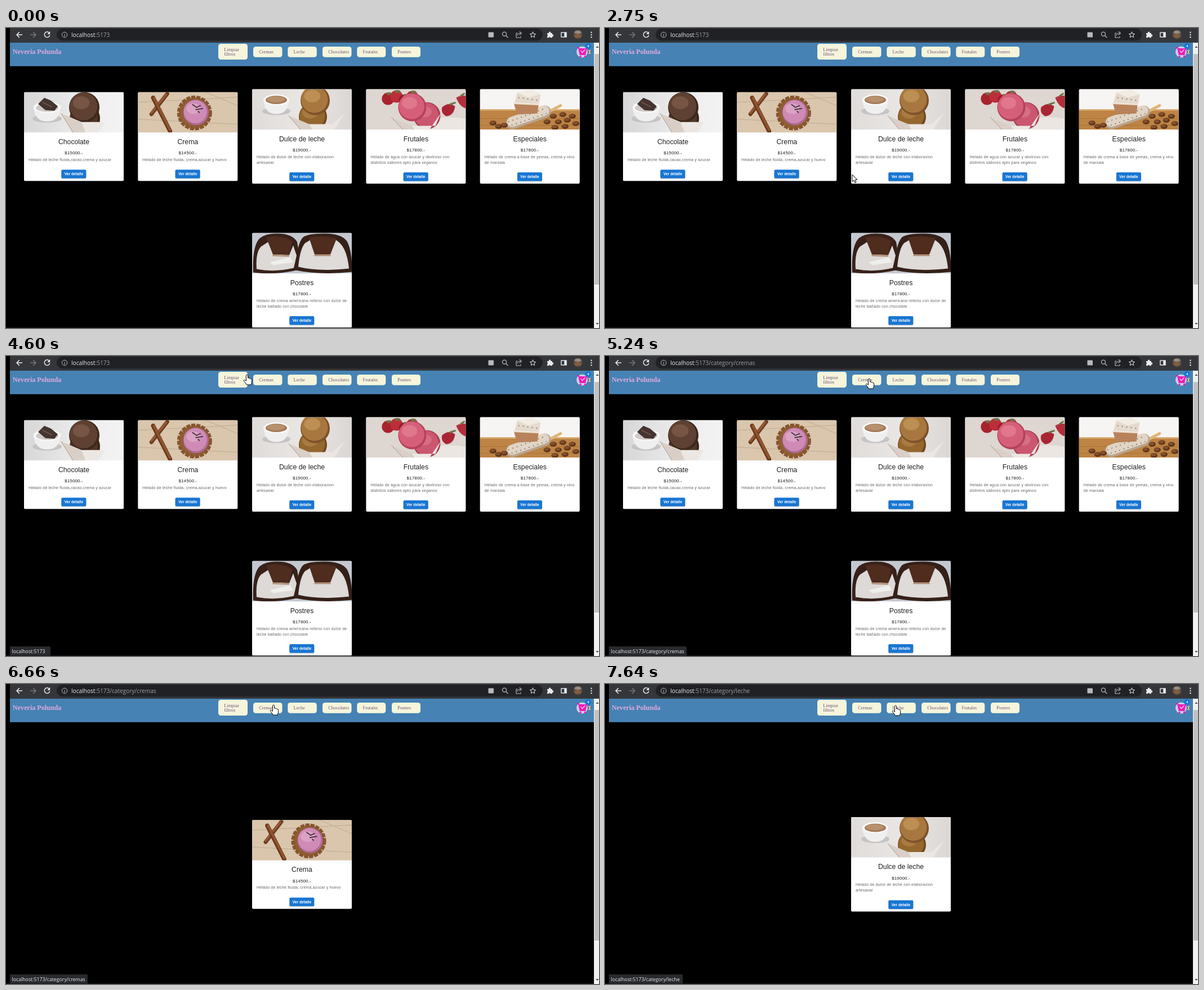
Recreate the animation shown at these times as an HTML page. Size 1053x532 px, loop 8 s.

```html
<!DOCTYPE html>
<html lang="es">
<head>
<meta charset="utf-8">
<title>Neveria Polunda</title>
<style>
  html, body { margin: 0; width: 100%; height: 100%; overflow: hidden; background: #000; }
  svg { display: block; width: 1053px; height: 532px; }
  text { white-space: pre; }
  .ui { font-family: "Open Sans", "Noto Sans", sans-serif; }
  .slab { font-family: "Liberation Serif", serif; }
  .card { font-family: "Liberation Sans", Arial, sans-serif; }
</style>
</head>
<body>
<svg id="stage" viewBox="0 0 1053 532" xmlns="http://www.w3.org/2000/svg"></svg>
<script>
const LOOP = 8000;
const HOST = 'localhost', PORT = ':5173';

// Shape helpers
const rect = (x, y, w, h, fill, r = 0) =>
  `<rect x="${x}" y="${y}" width="${w}" height="${h}" rx="${r}" fill="${fill}"/>`;
const oval = (x, y, rx, ry, fill) => `<ellipse cx="${x}" cy="${y}" rx="${rx}" ry="${ry}" fill="${fill}"/>`;
const dot = (x, y, r, fill) => oval(x, y, r, r, fill);
const shape = (d, fill) => `<path d="${d}" fill="${fill}"/>`;
const line = (d, stroke, w = 1.4) =>
  `<path d="${d}" fill="none" stroke="${stroke}" stroke-width="${w}" stroke-linecap="round" stroke-linejoin="round"/>`;
const text = (x, y, size, fill, str, more = '') =>
  `<text x="${x}" y="${y}" font-size="${size}" fill="${fill}" ${more}>${str}</text>`;

// Picture helpers; each picture fills a 177 by 71.5 box
const wall = fill => rect(-6, -6, 189, 84, fill);
const scoop = (x, y, r, light, base, dark) =>
  dot(x, y, r, dark) + dot(x - r * .05, y - r * .06, r * .91, base) +
  oval(x - r * .2, y - r * .3, r * .55, r * .42, light);
const bowl = (x, y, right, top) =>
  shape(`M${x} ${y}L${x + 36} ${y + 15}L${x + 78} ${y + 15}L${right} ${top}L${right - 22} 74H${x + 22}Z`, '#ece7e3') +
  shape(`M${x} ${y}L${x + 36} ${y + 15}L${x + 44} 74H${x + 22}Z`, '#d9cfc7') +
  line(`M${x} ${y}L${x + 22} 73`, '#a99a8e', 1);
const cup = (x, y, r) =>
  oval(x, y + 20, r + 2, 7, '#c6c4c3') +
  shape(`M${x - r} ${y}Q${x - r + 2} ${y + 25} ${x} ${y + 25}Q${x + r - 2} ${y + 25} ${x + r} ${y}Z`, '#efefef') +
  oval(x, y, r, r * .42, '#fafafa');

const pictures = {
  chocolate: () =>
    wall('url(#greyWall)') + cup(41, 27, 24) + oval(41, 28, 20, 7, '#cfcbc9') +
    shape('M25 21L36 10L48 15L60 25L54 33L38 32Z', '#45342f') + line('M33 18L49 26', '#6a544b', 2) +
    scoop(108, 47, 27, '#66472f', '#523624', '#3a2519') +
    scoop(107, 27, 27, '#765544', '#5e4132', '#3e291d') + bowl(66, 38, 153, 37),
  crema: () =>
    wall('#d9c6ad') + line('M0 18L177 9M0 48L177 57M120 0L177 24', '#c2a98c', 1) +
    line('M52 3L24 39', '#6f3b20', 7) + line('M50 4L24 37', '#955a34', 3.5) +
    line('M27 10L57 69', '#6b381f', 7.5) + line('M28 10L57 67', '#8f552f', 4) +
    `<circle cx="100.5" cy="37" r="28" fill="#9a6537" stroke="#85552f" stroke-width="6" stroke-dasharray="7 2"/>` +
    dot(100.5, 37, 25, '#8f5e36') + scoop(103, 36, 22.5, '#dba2c4', '#cf8bb6', '#b06b98') +
    line('M97 22L104 27L111 24M103 31L115 29M107 34L109 36', '#4a3846', 2),
  leche: () =>
    wall('url(#warmWall)') + cup(43, 19, 23) + oval(43, 19, 19, 7.6, '#a27a59') + oval(42, 18, 16, 5.4, '#b8906c') +
    scoop(108, 49, 25, '#a97a41', '#94672f', '#70491f') +
    scoop(112, 20, 26, '#bd8f54', '#a8773f', '#7d5329') + bowl(65, 47, 166, 41),
  frutales: () =>
    wall('#ded6d1') + oval(150, 66, 50, 16, '#ebe6e2') +
    [[39, 17, '#a8232e'], [54, 13, '#bb2f38'], [69, 20, '#9c1d2a'], [82, 14, '#b02a36']]
      .map(([x, y, fill]) => dot(x, y, 11, fill) + oval(x + 2, y - 9, 5, 2.5, '#6d7446')).join('') +
    shape('M135 32Q146 22 158 30Q156 47 142 48Q132 42 135 32Z', '#a92534') +
    shape('M160 15Q173 8 183 14V34Q168 36 160 15Z', '#b52d3b') + line('M149 27L158 24M168 12L174 8', '#6d7446', 3) +
    scoop(108, 47, 24, '#d76c83', '#cb566f', '#aa3c55') +
    scoop(82, 32, 25, '#e0778d', '#d55f78', '#b5425c') + bowl(45, 50, 133, 42),
  especiales: () =>
    wall('#f6f5f3') + rect(-6, 36, 189, 42, '#bd8445') +
    line('M-3 37H180', '#d7a668', 2.5) + line('M0 52H177M0 64H177', '#aa7237', 1) +
    line('M122 40L143 29', '#dfb779', 5) +
    line('M57 60L115 40', '#b8a48c', 22) + line('M57 58L114 38', '#e0d5c6', 18) +
    shape('M61 26L66 6L92 1L108 9L104 30L84 34Z', '#e4dacd') + shape('M66 6L92 1L108 9L86 15Z', '#f1ebe2') +
    shape('M60 25L104 27L102 43L66 45Z', '#b9825a') + line('M61 25L104 27', '#eee4d6', 3) +
    `<path d="M50 58L116 34M56 64L118 43M68 15L104 20" fill="none" stroke="#9b7f62" stroke-width="2" stroke-dasharray="2 6"/>` +
    [[23, 60], [33, 66], [43, 64], [119, 58], [130, 48], [139, 58], [147, 45], [155, 55], [151, 66], [164, 48], [170, 61], [133, 68]]
      .map(([x, y]) => oval(x, y, 6.2, 4.2, '#5e341c') + oval(x - 1, y - 1, 4.5, 2.5, '#85502c')).join(''),
  postres: () =>
    wall('#c3c8d0') +
    shape('M2 70Q0 22 14 9Q24 1 44 1Q72 1 80 16L84 40L79 66Q40 75 2 70Z', '#38211a') +
    shape('M8 64Q6 34 16 24L30 15L37 38L66 39L73 22L79 40L74 62Q40 70 8 64Z', '#dcd9d6') +
    shape('M25 8Q48 2 71 14L66 39L37 38Z', '#4e2c1e') + line('M37 40L65 41', '#a3683c', 1.5) +
    shape('M31 52L67 43L73 52L38 57Z', '#f0eeea') +
    shape('M77 66Q79 20 90 8Q98 1 128 1Q158 1 168 14Q177 28 178 69Q122 75 77 66Z', '#352019') +
    shape('M82 60Q85 28 94 18L104 12L112 38L138 38L148 12Q168 22 172 63Q119 69 82 60Z', '#dedbd8') +
    shape('M101 8Q126 3 150 10L139 38H111Z', '#4f2c1e') + line('M111 40H139', '#a3683c', 1.5)
};

const products = [
  { id: 'chocolate', name: 'Chocolate', price: 15000, about: ['Helado de leche fluida,cacao,crema y azucar'], at: [32, 113.7] },
  { id: 'crema', name: 'Crema', price: 14500, about: ['Helado de leche fluida, crema,azucar y huevo'], at: [234.3, 113.7] },
  { id: 'leche', name: 'Dulce de leche', price: 19000, about: ['Helado de dulce de leche con elaboracion', 'artesanal'], at: [437, 108.5] },
  { id: 'frutales', name: 'Frutales', price: 17800, about: ['Helado de agua con azucar y dextroso con', 'distintos sabores apto para veganos'], at: [639.4, 108.5] },
  { id: 'especiales', name: 'Especiales', price: 17800, about: ['Helado de crema a base de yemas, crema y vino', 'de marsala'], at: [841.7, 108.5] },
  { id: 'postres', name: 'Postres', price: 17800, about: ['Helado de crema americana relleno con dulce de', 'leche bañado con chocolate'], at: [437, 363.6] }
];

function card(item, [x, y] = item.at) {
  const extra = (item.about.length - 1) * 10;
  const mid = 'text-anchor="middle"';
  return `<g class="card" transform="translate(${x} ${y})">` +
    rect(0, 0, 177, 157.6 + extra, '#fff', 2) +
    `<g clip-path="url(#photo)"><g filter="url(#soft)">${pictures[item.id]()}</g></g>` +
    text(88.5, 92.3, 12.25, '#212121', item.name, mid) +
    text(88.5, 110.8, 8, '#1c1c1c', `$${item.price}.-`, mid + ' letter-spacing=".15"') +
    item.about.map((s, i) => text(8, 122.2 + i * 10, 7, '#666', s, 'letter-spacing=".17"')).join('') +
    rect(66, 138.2 + extra, 44.4, 15.6, '#0003', 2) +
    rect(66.3, 137.5 + extra, 44, 15.4, '#1976d2', 2) +
    text(88.4, 147.5 + extra, 6.7, '#fff', 'Ver detalle', mid + ' font-weight="bold"') + '</g>';
}

const navButtons = [
  [377, 28, 52, 28, 'Limpiar', 'filtros'], [439, 33, 51.5, 18.8, 'Cremas'], [500.3, 33, 51.5, 18.8, 'Leche'],
  [562, 33, 51.5, 18.8, 'Chocolates'], [623.3, 33, 51, 18.8, 'Frutales'], [685, 33, 51, 18.8, 'Postres']
];

function toolbar() {
  const ink = '#e8eaed', soft = '#b6b9bd';
  return rect(7, 0, 1046, 26, '#35363a') + rect(90, 1, 863, 21.5, '#202124', 10.7) +
    line('M28.5 12H19.5M23.5 7.5L19 12L23.5 16.5', ink, 1.5) +
    line('M43.5 12H52.5M48.5 7.5L53 12L48.5 16.5', '#74767a', 1.5) +
    line('M76.6 8.4A4.8 4.8 0 1 0 77.6 13.2', ink, 1.5) + shape('M78.2 6V11H73.2Z', ink) +
    `<circle cx="104" cy="12" r="4.7" fill="none" stroke="${soft}"/>` + line('M104 11.7V14.4M104 9.5V9.6', soft, 1.1) +
    rect(856.5, 7.5, 9.5, 9, soft, 1) +
    `<circle cx="885" cy="10.7" r="3.5" fill="none" stroke="${soft}" stroke-width="1.3"/>` + line('M888 13.7L891 16.7', soft) +
    line('M908 9H906V17H914V15M908 13Q908.5 9.5 913 9.2M912 6.5L915.5 9.2L912 12', soft, 1.1) +
    line('M935.5 7L937 10.3L940.5 10.6L937.8 13L938.7 16.5L935.5 14.6L932.3 16.5L933.2 13L930.5 10.6L934 10.3Z', ink, 1) +
    shape('M961 9H964A1.8 1.8 0 1 1 967.4 9H970V11.5A1.8 1.8 0 1 1 970 15V17.3H967.2A1.8 1.8 0 0 0 963.8 17.3H961V14.5A1.8 1.8 0 0 0 961 11.3Z', ink) +
    `<rect x="986" y="8" width="9" height="8" fill="none" stroke="${ink}" stroke-width="1.4"/>` + rect(991.3, 8, 4, 8, ink) +
    dot(1015.5, 11.5, 8, '#5f4c42') + oval(1015.5, 7.5, 6, 3, '#978a82') + oval(1015.5, 14, 6, 3, '#85603f') +
    [7.8, 12, 16.2].map(y => dot(1039.5, y, 1.2, ink)).join('');
}

function header() {
  return rect(7, 26, 1037, 41.7, '#4682b4') +
    '<g class="slab">' + text(12, 46, 12.1, '#e0aadd', 'Neveria Polunda', 'font-weight="bold"') +
    navButtons.map(([x, y, w, h, ...rows]) => rect(x, y, w, h, '#f5f5dc', 4.5) +
      rows.map((s, i) => text(x + 10.3, (rows.length > 1 ? 40.5 : 45) + i * 8.6, 8.3, '#70517c', s)).join('')).join('') + '</g>' +
    dot(1023, 42.5, 10, '#c9cfee') +
    line('M1014.5 35H1017L1019.5 47H1029', '#f01cb5', 2) + shape('M1017 36H1032L1029.5 46H1019Z', '#f01cb5') +
    line('M1021 41L1023.5 43.5L1028 38.5', '#d9d4f2', 1.2) +
    dot(1020, 50.5, 1.8, '#f01cb5') + dot(1028.5, 50.5, 1.8, '#f01cb5') +
    dot(1033.7, 32, 5.3, '#1976d2') +
    text(1033.7, 34.3, 6.2, '#fff', '4', 'class="card" text-anchor="middle" font-weight="bold"') +
    rect(1033.8, 38.2, 5, 8.6, '#333', 1) + rect(1034.3, 38.7, 4, 7.6, '#efefef', .6) +
    text(1036.3, 45.2, 7, '#111', '0', 'class="card" text-anchor="middle"');
}

const scrollbar = () => rect(1044, 26, 9, 506, '#f1f1f1') + rect(1045, 46, 8, 409, '#c1c1c1') +
  shape('M1047.2 35L1050 32L1052.8 35Z', '#505050') + shape('M1047.2 523L1050 526L1052.8 523Z', '#505050');

const stage = document.getElementById('stage');
stage.innerHTML = `<defs>
  <clipPath id="photo"><path d="M0 71.6V2Q0 0 2 0H175Q177 0 177 2V71.6Z"/></clipPath>
  <filter id="soft"><feGaussianBlur stdDeviation=".7"/></filter>
  <linearGradient id="greyWall"><stop stop-color="#d6d5d6"/><stop offset=".6" stop-color="#efeeee"/><stop offset="1" stop-color="#f4f3f3"/></linearGradient>
  <linearGradient id="warmWall"><stop stop-color="#dfdbd9"/><stop offset=".5" stop-color="#e9e6e4"/><stop offset="1" stop-color="#dad6d4"/></linearGradient>
  </defs>` + rect(0, 0, 1053, 532, '#000') + toolbar() +
  `<text class="ui" x="116" y="15.6" font-size="10.15" fill="#e8eaed">${HOST}<tspan id="url" fill="#9aa0a6"></tspan></text>` +
  header() + '<g id="list"></g>' + rect(0, 531, 1044, 1, '#15191d') + scrollbar() +
  `<g id="status" class="ui"><path fill="#292a2d"/>${text(10.5, 526.7, 8.75, '#e8eaed', '')}</g>
  <g id="cursor" fill="#fff" stroke="#000" stroke-linejoin="round"><path/></g>`;

const $ = id => document.getElementById(id);
const list = $('list'), url = $('url'), hintBar = $('status'), cursor = $('cursor');
const [hintBox, hintText] = hintBar.children;

// Pointer strokes: start, end, number of steps, then [step, x, y] stops
const strokes = [
  [930, 1690, 12, [[0, 965, 534], [1, 953, 520], [5, 880, 498], [12, 750, 474]]],
  [1760, 2540, 13, [[0, 750, 474], [4, 580, 450], [8, 373, 390], [13, 451, 295]]],
  [2610, 3190, 10, [[0, 451, 295], [3, 439, 260], [6, 390, 130], [10, 312, 20]]],
  [3570, 4340, 12, [[0, 312, 20], [3, 345, 8], [7, 401, 31.5], [12, 404, 38]]],
  [4410, 5110, 11, [[0, 404, 38], [4, 428, 33], [8, 452, 36], [11, 469, 40]]],
  [6660, 7460, 13, [[0, 469, 40], [3, 487, 31], [5, 503, 28], [8, 517, 32.5], [13, 516, 38]]]
];

function along(stops, step) {
  const i = Math.max(1, stops.findIndex(s => s[0] >= step));
  const [a, ax, ay] = stops[i - 1], [b, bx, by] = stops[i];
  const u = (step - a) / (b - a);
  return [ax + (bx - ax) * u, ay + (by - ay) * u];
}

function pointer(t) {
  const stroke = strokes.filter(s => t >= s[0]).pop();
  if (!stroke) return null;
  const [start, end, count, stops] = stroke;
  const step = Math.floor((t - start) / (end - start) * (count - 1) + .3);
  return along(stops, Math.min(count, step + 1));
}

const ARROW = 'M0 0V12.5L2.9 9.8L4.9 14.4L7 13.5L5 9H9Z';
const HAND = 'M-1.6 1.2Q0 -1.2 1.6 1.2V6Q3.2 5 4.2 6.8Q5.8 6 6.6 7.6Q8.6 7 8.6 9.4V13Q8.2 15 7 18H-.8Q-2 14.8-5.5 11.5Q-6 8.6-3.4 9.8L-1.6 11.3Z';
const BEAM = 'M-2.5 -7H2.5M0 -7V7M-2.5 7H2.5';

function drawPointer(t) {
  const at = pointer(t);
  cursor.style.display = at ? '' : 'none';
  if (!at) return;
  const [x, y] = at;
  const hover = navButtons.some(([bx, by, w, h]) => x >= bx && x <= bx + w && y >= by && y <= by + h);
  const beam = y < 23;
  cursor.setAttribute('transform', `translate(${x.toFixed(1)} ${y.toFixed(1)})`);
  cursor.setAttribute('stroke', beam ? '#e8eaed' : '#000');
  cursor.firstElementChild.setAttribute('d', beam ? BEAM : hover ? HAND : ARROW);
}

// Link hints: shown from, fading from, path, box width
const hints = [[4060, 4650, '', 72], [4780, 7080, '/category/cremas', 138], [7300, LOOP, '/category/leche', 131]];

function drawHint(t) {
  const hint = hints.filter(h => t >= h[0]).pop();
  const alpha = hint ? Math.max(0, Math.min(1, (t - hint[0]) / 120, 1 - (t - hint[1]) / 125)) : 0;
  hintBar.setAttribute('opacity', alpha);
  if (!hint) return;
  const right = 7 + hint[3];
  hintText.textContent = HOST + PORT + hint[2];
  hintBox.setAttribute('d', `M7 515H${right - 2}Q${right} 515 ${right} 517V531H7Z`);
}

const views = {
  all: () => products.map(p => card(p)).join(''),
  cremas: () => card(products[1], [437, 241.2]),
  leche: () => card(products[2], [437, 236])
};
let shown;

function draw(t) {
  const view = t < 5310 ? 'all' : t < 7640 ? 'cremas' : 'leche';
  if (view !== shown) list.innerHTML = views[shown = view]();
  url.textContent = PORT + (t < 5240 ? '' : t < 7640 ? '/category/cremas' : '/category/leche');
  drawHint(t);
  drawPointer(t);
}

const began = performance.now();
function tick() {
  draw((performance.now() - began) % LOOP);
  requestAnimationFrame(tick);
}
tick();
</script>
</body>
</html>
```
